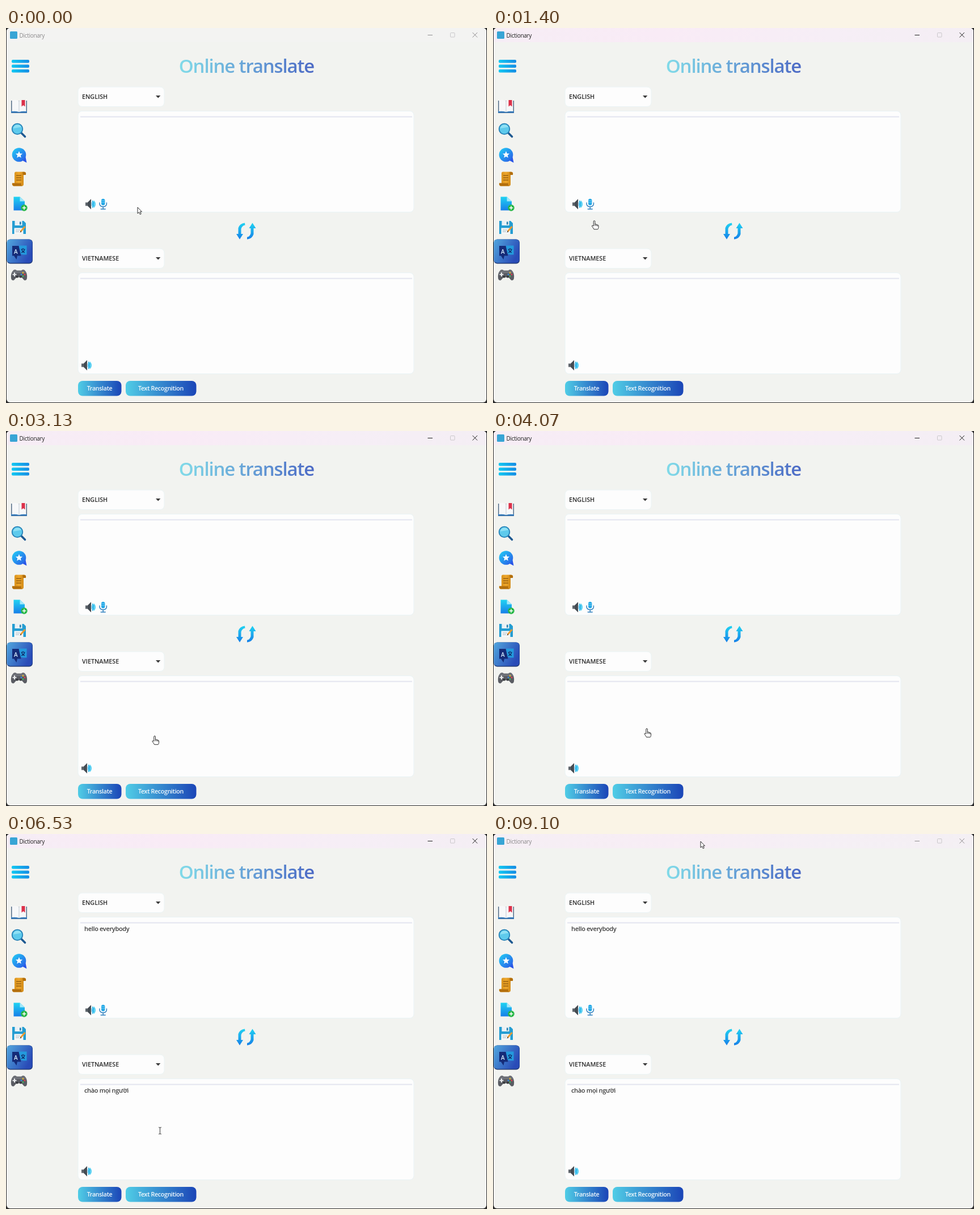
Recreate the animation shown at these times as an HTML page. Size 848 by 661 pixels, loop 9.13 s.

```html
<!DOCTYPE html>
<html lang="en">
<head>
<meta charset="utf-8">
<title>Dictionary</title>
<style>
  html, body { margin: 0; width: 100%; height: 100%; overflow: hidden; background: #2b2b2b; }
  svg { display: block; width: 848px; height: 661px; }
  text { font-family: "Open Sans", "Noto Sans", sans-serif; font-weight: 600; letter-spacing: -.03em; }
  .label { font-size: 10.8px; letter-spacing: -.005em; fill: #2c2c2c; }
  .body { font-size: 11px; fill: #3b3b3b; }
  .button { font-size: 10.7px; fill: #f4fafd; text-anchor: middle; }
</style>
</head>
<body>
<svg viewBox="0 0 848 661">
  <defs>
    <linearGradient id="heading" gradientUnits="userSpaceOnUse" x1="303" y1="0" x2="545" y2="0">
      <stop stop-color="#82dce9"/><stop offset="1" stop-color="#4c69c5"/>
    </linearGradient>
    <linearGradient id="action"><stop stop-color="#50cde6"/><stop offset="1" stop-color="#1b45b7"/></linearGradient>
    <linearGradient id="tile" x2="1" y2=".5"><stop stop-color="#52a7de"/><stop offset="1" stop-color="#294bb7"/></linearGradient>
    <linearGradient id="sky" x2="0" y2="1"><stop stop-color="#20d3f2"/><stop offset="1" stop-color="#177fe8"/></linearGradient>
    <linearGradient id="bar"><stop stop-color="#12c9f2"/><stop offset="1" stop-color="#168ce4"/></linearGradient>
    <linearGradient id="bubble" x2="1" y2="1"><stop stop-color="#22d1f6"/><stop offset="1" stop-color="#2a55e6"/></linearGradient>
    <linearGradient id="gold" x2="1"><stop stop-color="#d18a17"/><stop offset=".5" stop-color="#eda62a"/><stop offset="1" stop-color="#c57d10"/></linearGradient>
    <linearGradient id="pink"><stop stop-color="#f6edf5"/><stop offset=".35" stop-color="#f9ebf6"/><stop offset=".7" stop-color="#f6eef6"/><stop offset="1" stop-color="#f4eef4"/></linearGradient>
    <clipPath id="frame"><rect x="1" width="846" height="660" rx="6"/></clipPath>
    <g id="speaker">
      <path d="M0 6h4l6-6v18l-6-6H0z" fill="#5d646b"/>
      <path d="M4 6l6-6v18l-6-6z" fill="#454c53"/>
      <path d="M11 4.5q3 4.5 0 9z" fill="#1aa5e4"/>
      <path d="M11.5 2.5q2.5 0 3.5 3.5v6q-1 3.500-3.500 3.500q2.500-6.500 0-13z" fill="#25b7eb"/>
      <path d="M14.500 2q3.500 3 3.500 7t-3.500 7q1.500-7 0-14z" fill="#55cff2"/>
    </g>
    <g id="combo">
      <rect width="152" height="34.500" rx="7" fill="#fdfdfd" stroke="#ebf4f5"/>
      <path d="M137 15h8.400l-4.200 4.600z" fill="#3b3b3b"/>
    </g>
    <g id="panel">
      <rect width="592" height="178" rx="7" fill="#fdfdfd" stroke="#e9f3f6"/>
      <path d="M4 10h585" stroke="#e4e5f0" stroke-width="2.200"/>
    </g>
  </defs>

  <g clip-path="url(#frame)">
    <rect width="848" height="661" fill="#f2f3f0"/>
    <rect width="848" height="25" fill="#f3f3f2"/>
    <rect id="tint" width="848" height="25" fill="url(#pink)"/>
  </g>

  <rect x="7" y="6" width="13" height="13" rx="1.500" fill="#38a5d5"/>
  <text id="caption" x="23.500" y="16.500" style="font-size:10px;font-weight:400">Dictionary</text>
  <g id="controls" fill="none">
    <path d="M743.500 12.500h8.500M822.500 8l8.500 8.500m0-8.500l-8.500 8.500"/>
  </g>
  <rect x="783.500" y="8.500" width="7.500" height="7.500" rx="1" fill="none" stroke="#c9c7ca"/>

  <text x="424" y="79" text-anchor="middle" fill="url(#heading)" style="font-size:33px;letter-spacing:-.035em">Online translate</text>

  <g fill="url(#bar)">
    <rect x="10" y="56" width="31" height="5.400" rx="2"/>
    <rect x="10" y="64.500" width="31" height="5.400" rx="2"/>
    <rect x="10" y="73" width="31" height="5.400" rx="2"/>
  </g>

  <!-- book -->
  <path d="M9 128h28v22H9z" fill="#526c86"/>
  <path d="M9 146h28v3.500H9z" fill="#3479ba"/>
  <path d="M10.500 127.500q6-2 12.500 1q6-3 12.500-1V147q-6-1-12.500 1q-6-2-12.500-1z" fill="#f7f8f9"/>
  <path d="M23 128.500V148" stroke="#c3cdd6"/>
  <path d="M27.500 127h6v11.500l-3-2.500l-3 2.500z" fill="#dc3049"/>

  <!-- magnifier -->
  <path d="M27 185l6.500 6.500" stroke="#1e5991" stroke-width="3.600" stroke-linecap="round"/>
  <circle cx="20" cy="178" r="9.300" fill="#5ecaec" stroke="#2682b7" stroke-width="1.800"/>
  <path d="M13 177q1-6 7-6.500q5 0 7 4z" fill="#8fe0f4"/>

  <!-- favourite -->
  <path d="M28 233l8.500 4.500l-2-10z" fill="#2a55e6"/>
  <circle cx="23" cy="223.500" r="12.300" fill="url(#bubble)"/>
  <path id="star" fill="#fafdff"/>

  <!-- scroll -->
  <path d="M17 253.500h15q4 0 3 5h-4v17q0 3-3 3H13q-3-1-2-5h4v-17q0-3 2-3z" fill="url(#gold)"/>
  <path d="M29 254q4-1 6 1.500v3.500h-5zM11 273.500h16q-1 4 2 5H14q-3 0-3-5z" fill="#b36f0d"/>
  <path d="M18 260h9m-9 4h9m-9 4h9" stroke="#98600f" stroke-width="1.300"/>

  <!-- new file -->
  <path d="M13.500 297.500h11l8.500 8v16H13.500z" fill="url(#sky)"/>
  <path d="M24.500 297.500v8H33z" fill="#a2e8fa"/>
  <circle cx="32" cy="317" r="5.700" fill="#28b747"/>
  <path d="M32 313.800v6.400m-3.200-3.200h6.400" stroke="#fff" stroke-width="1.500"/>

  <!-- save -->
  <path d="M11 340h20l4 4v19H11z" fill="#249dd2"/>
  <path d="M15.500 340h13v8h-13z" fill="#eaf1f5"/>
  <path d="M24 341.500h2.500v5H24z" fill="#287fad"/>
  <path d="M14.500 352.500h16V363h-16z" fill="#f5f7f7"/>
  <path d="M17 356h8m-8 3h6" stroke="#9db4c3"/>
  <path d="M26 358.500l7.500-8.500" stroke="#ec9a2f" stroke-width="2.800"/>
  <path d="M24.500 360.500l1-3l2 1.800z" fill="#473f3c"/>

  <!-- active page -->
  <rect x="1.500" y="372.500" width="45.500" height="43" rx="6" fill="#223c78"/>
  <rect x="1.500" y="372.500" width="45" height="41.500" rx="6" fill="url(#tile)"/>
  <path d="M23 383.500h13.500v16H30l-7-2z" fill="#249add"/>
  <path d="M11 384h11.500l4 17.500H20L18.500 408L14 401.500h-3z" fill="#152b78"/>
  <text x="14" y="397.500" fill="#d9efff" style="font-size:10px">A</text>
  <path d="M26.500 390h7m-3.500-2v2m-2.500 0q1 4 5.500 6m0-6q-1 4-6 6" stroke="#0f2966" stroke-width="1.200" fill="none"/>

  <!-- gamepad -->
  <path d="M13 427q3-2 6 .500h8q3-2.500 6-.500q5 5 4 14q-1 5-5 3.500l-4.500-5h-9l-4.500 5q-4 1.500-5-3.500q-1-9 4-14z" fill="#5a5c63"/>
  <path d="M13 428q3-2 6 .500h8q3-2.500 6-.500q2 2 2.500 4H10.500q.500-2 2.500-4z" fill="#70737a"/>
  <path d="M15 431v7m-3.500-3.500h7" stroke="#eceef0" stroke-width="2"/>
  <circle cx="30" cy="431.500" r="1.400" fill="#e5b72f"/><circle cx="33" cy="434.500" r="1.400" fill="#df4350"/>
  <circle cx="27" cy="434.500" r="1.400" fill="#388fda"/><circle cx="30" cy="437.500" r="1.400" fill="#43b45e"/>
  <circle cx="19.500" cy="438.500" r="2" fill="#35373c"/><circle cx="26" cy="438.500" r="2" fill="#35373c"/>

  <use href="#combo" x="127" y="104"/>
  <use href="#combo" x="127" y="389"/>
  <text class="label" x="134" y="125">ENGLISH</text>
  <text class="label" x="134" y="410">VIETNAMESE</text>
  <use href="#panel" x="127" y="146.500"/>
  <use href="#panel" x="127" y="431.500"/>
  <use href="#speaker" x="140" y="301.500"/>
  <use href="#speaker" x="133" y="585.500"/>

  <rect x="168" y="301" width="6.400" height="11.500" rx="3.200" fill="#25a8e6"/>
  <path d="M168 304.500h6.400m-6.400 3h6.400" stroke="#7ed4f5" stroke-width=".8"/>
  <path d="M165 307.500v3q1 4.500 6.200 4.500t6.200-4.500v-3M171.200 315v4m-4.500 .300h9" fill="none" stroke="#2d7fbe" stroke-width="1.400"/>

  <!-- swap -->
  <path d="M421 343.500q-9 1-11.500 9v10.500H406l6 9.500l6-9.500h-3.500v-9q2-6 7-6.500z" fill="url(#sky)"/>
  <path d="M425 372.500q9-1 11.500-9v-10.500h4l-6-9.500l-6 9.500h3v9q-2 6-6.500 6.500z" fill="url(#sky)"/>

  <rect x="127" y="622" width="76.500" height="26.500" rx="8" fill="url(#action)"/>
  <rect x="211" y="622" width="124.500" height="26.500" rx="8" fill="url(#action)"/>
  <text class="button" x="165" y="639">Translate</text>
  <text class="button" x="273" y="639">Text Recognition</text>

  <g id="speech">
    <text class="body" x="138" y="171">hello everybody</text>
    <text class="body" x="138" y="456">chào mọi người</text>
  </g>

  <g id="cursor" fill="#fff" stroke="#171717" stroke-linejoin="round">
    <path id="arrow" d="M0 0v11l2.500-2.300l1.800 3.900l1.900-.9l-1.800-3.800h3.100z" stroke-width=".9"/>
    <path id="hand" d="M-1.200 9V1q0-1.500 1.300-1.500T1.400 1v4.700q1.700-.8 2.300.6q1.700-.6 2.100.8q1.700-.2 1.700 1.300v3q-.2 2-1.300 3.300H-.5q-.5-1.500-2.700-4.200q-1.500-1.900-.5-2.400q1-.5 2.500.9zM1.400 5.700v3M3.700 6.300v2.600M5.800 7.100v2.300" stroke-width=".9"/>
    <path id="beam" d="M-2.500-6q2 0 2.500 1q.5-1 2.500-1M0-5V5M-2.500 6q2 0 2.500-1q.5 1 2.500 1" fill="none" stroke="#555" stroke-width="1.200"/>
  </g>
</svg>
<script>
  const LOOP = 9130, FOCUS = 1150, RESULT = 5850, BLUR = 8970;
  const byId = id => document.getElementById(id);
  const clamp = v => Math.min(1, Math.max(0, v));
  const ease = v => v * v * (3 - 2 * v);

  // time, x, y of the pointer's hotspot
  const route = [
    [0, 232, 316], [120, 232, 316], [720, 172, 323], [1250, 172, 323],
    [1970, 229, 474], [3130, 262, 538], [3900, 271, 525],
    [6530, 271.5, 523], [8050, 271.5, 523], [9050, 366, 13], [LOOP, 366, 13]
  ];

  function pointerAt(t) {
    const i = route.findIndex((stop, n) => n > 0 && t <= stop[0]);
    const [t0, x0, y0] = route[i - 1], [t1, x1, y1] = route[i];
    const k = ease((t - t0) / (t1 - t0));
    return [x0 + (x1 - x0) * k, y0 + (y1 - y0) * k];
  }

  function shapeAt(t, x, y) {
    if (t < RESULT) return t >= FOCUS || x < 182 ? 'hand' : 'arrow';
    const overText = x > 127 && x < 719 && (y > 158 && y < 298 || y > 443 && y < 583);
    return overText ? 'beam' : 'arrow';
  }

  function draw(t) {
    const [x, y] = pointerAt(t);
    const shape = shapeAt(t, x, y);
    byId('cursor').setAttribute('transform', `translate(${x} ${y})`);
    for (const id of ['arrow', 'hand', 'beam']) byId(id).style.display = id === shape ? '' : 'none';

    const focused = t >= FOCUS && t < BLUR;
    byId('caption').setAttribute('fill', focused ? '#202020' : '#8b898b');
    byId('controls').setAttribute('stroke', focused ? '#202020' : '#8f8d8f');
    byId('tint').setAttribute('opacity', clamp((t - FOCUS) / 150) * (1 - clamp((t - BLUR) / 500)));
    byId('speech').style.display = t >= RESULT ? '' : 'none';
  }

  byId('star').setAttribute('d', 'M' + Array.from({ length: 10 }, (_, i) => {
    const r = i % 2 ? 2.9 : 6.4, a = i * Math.PI / 5;
    return `${23 + r * Math.sin(a)} ${223.5 - r * Math.cos(a)}`;
  }).join('L') + 'z');

  const start = performance.now();
  function tick() {
    draw((performance.now() - start) % LOOP);
    requestAnimationFrame(tick);
  }
  tick();
</script>
</body>
</html>
```
